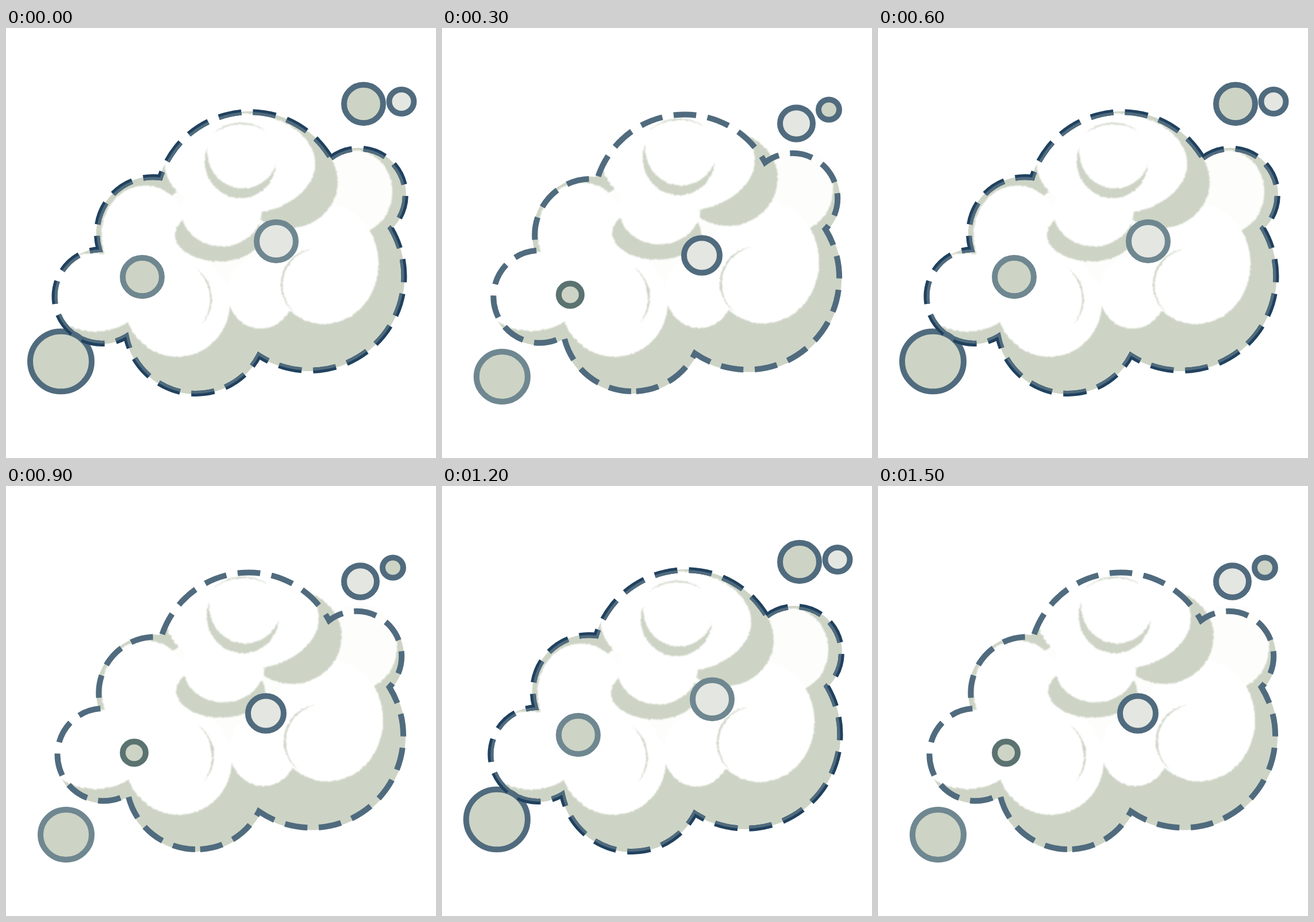
These frames come from a looping animation (748 px wide and 748 px high, 1.8 s). An HTML page:

```html
<!DOCTYPE html>
<html lang="en">
<head>
<meta charset="utf-8">
<title>Cloud with bubbles</title>
<style>
  html, body { margin: 0; width: 100%; height: 100%; overflow: hidden; background: #fff; }
  svg { display: block; width: 100%; height: 100%; }
</style>
</head>
<body>
<svg id="stage" viewBox="0 0 748 748" xmlns="http://www.w3.org/2000/svg">
  <defs>
    <filter id="chalk" filterUnits="userSpaceOnUse" x="0" y="0" width="748" height="748" color-interpolation-filters="sRGB">
      <feTurbulence type="fractalNoise" baseFrequency=".22" numOctaves="2" seed="4" result="grain"/>
      <feDisplacementMap in="SourceGraphic" in2="grain" scale="4" xChannelSelector="R" yChannelSelector="G"/>
      <feGaussianBlur stdDeviation=".8"/>
    </filter>
  </defs>
</svg>
<script>
const WHITE = '#fff', CREAM = '#fdfdfb', SAGE = '#cdd4c5', PALE = '#e4e6e1';
const SLATE = '#506b7e', NAVY = '#20415e', MIST = '#6f8790', MOSS = '#5a7270';
const RING = 10;
const stage = document.getElementById('stage');

function add(parent, tag, attrs) {
  const el = document.createElementNS(stage.namespaceURI, tag);
  for (const key in attrs) el.setAttribute(key, attrs[key]);
  return parent.appendChild(el);
}

// Each lobe is a clockwise arc: end x, end y, radius, long way round or not.
const outline = (start, lobes) => `M${start}` +
  lobes.map(([x, y, r, long = 0]) => `A${r} ${r} 0 ${long} 1 ${x} ${y}`).join('') + 'Z';

// A thin sickle between two arcs that share their ends.
const sickle = (x1, y1, x2, y2, r1, r2, sweep) =>
  `M${x1} ${y1}A${r1} ${r1} 0 0 ${sweep} ${x2} ${y2}A${r2} ${r2} 0 0 ${1 - sweep} ${x1} ${y1}Z`;

// Overlapping puffs, back to front: a shaded one under a white one leaves a crescent.
const puffs = [
  [385, 365, 135, 105, CREAM],
  [608, 285, 64, 72, CREAM],
  [553, 410, 95, 105, WHITE],
  [443, 460, 58, 63, WHITE],
  [242, 360, 76, 86, WHITE],
  [155, 460, 88, 68, WHITE],
  [298, 480, 91, 92, WHITE],
  [492, 268, 85, 80, SAGE],
  [370, 360, 76, 46, SAGE],
  [375, 318, 70, 62, WHITE],
  [407, 236, 131, 88, WHITE],
  [408, 232, 62, 64, SAGE],
  [412, 215, 62, 64, WHITE]
];
const sickles = [
  [357, 186, 453, 180, 73, 82, 1],
  [330, 418, 340, 516, 64, 71, 1],
  [535, 384, 505, 497, 62, 64, 0]
];

const poses = [
  {
    edge: outline([565, 226], [
      [670, 349, 81], [440, 570, 164], [209, 537, 124],
      [162, 385, 82, 1], [268, 260, 98], [565, 226, 164]
    ]),
    length: 1843, rim: 2, twoTone: true, swell: '',
    bubbles: [
      [622, 132, 39, SAGE, SLATE], [688, 128, 26.5, PALE, SLATE], [470, 371, 39, PALE, MIST],
      [237, 433, 39, SAGE, MIST], [95.5, 580, 58.5, SAGE, SLATE]
    ]
  },
  {
    edge: outline([329, 632], [
      [212, 536, 121], [165, 387, 80.5, 1], [270, 263, 98],
      [562, 234, 159], [667, 350, 78.5], [440, 566, 160], [329, 632, 121]
    ]),
    length: 1849, rim: 8, twoTone: false,
    swell: 'translate(150 573) scale(1.016 1.018) translate(-150 -573)',
    bubbles: [
      [616.5, 166, 33.5, PALE, SLATE], [673, 142, 23, SAGE, SLATE], [452, 395.5, 36, PALE, SLATE],
      [223, 464, 25, SAGE, MOSS], [104.5, 606.5, 49.5, SAGE, MIST]
    ]
  }
];

function draw({ edge, length, rim, twoTone, swell, bubbles }) {
  const g = add(stage, 'g', {});
  add(g, 'path', { d: edge, fill: SAGE, stroke: SAGE, 'stroke-width': rim });

  const body = add(add(g, 'g', { filter: 'url(#chalk)' }), 'g', { transform: swell });
  for (const [cx, cy, rx, ry, fill] of puffs) add(body, 'ellipse', { cx, cy, rx, ry, fill });
  for (const s of sickles) add(body, 'path', { d: sickle(...s), fill: SAGE });

  for (const [cx, cy, r, fill, stroke] of bubbles) {
    const rx = r - RING / 2, ry = r * .98 - RING / 2;
    add(g, 'ellipse', { cx, cy, rx, ry, fill, stroke, 'stroke-width': RING });
  }

  const dashes = (stroke, extra) => add(g, 'path', {
    d: edge, fill: 'none', stroke, 'stroke-width': RING,
    pathLength: length, 'stroke-dasharray': '40 20', ...extra
  });
  if (twoTone) {
    add(add(g, 'clipPath', { id: 'inside' }), 'path', { d: edge });
    dashes(NAVY);
    dashes(SLATE, { 'clip-path': 'url(#inside)' });
  } else {
    dashes(SLATE);
  }
  return g;
}

// The two poses swap every 300 ms.
poses.map(draw).forEach((g, i) => g.animate(
  { opacity: i ? [0, 1] : [1, 0] },
  { duration: 600, iterations: Infinity, easing: 'steps(2, jump-none)' }
));
</script>
</body>
</html>
```
